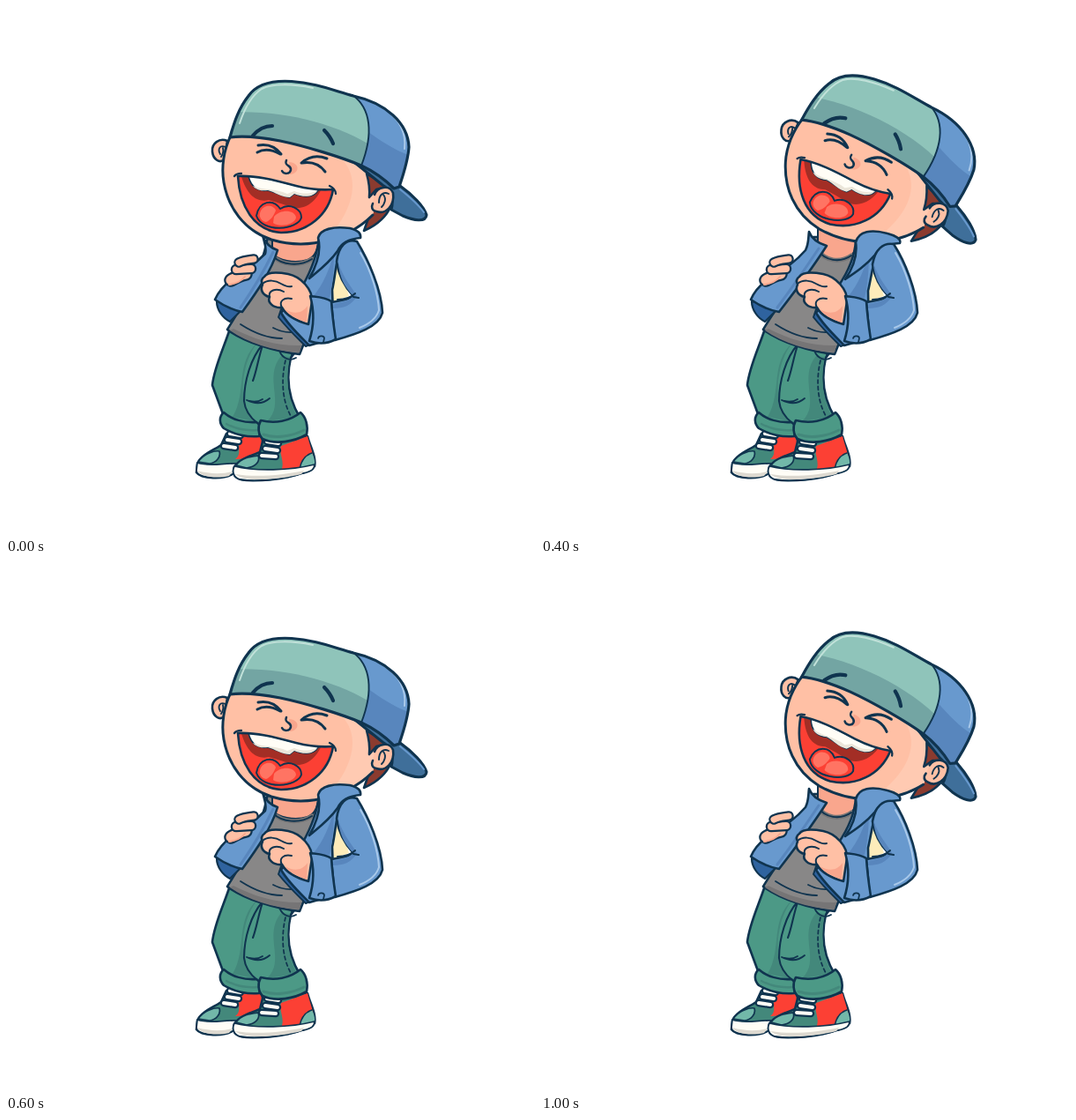
Animation, 600 px wide and 600 px high, one loop 1.2 s. Source, as an HTML page:

```html
<!DOCTYPE html>
<html lang="en">
<head>
<meta charset="utf-8">
<title>Laughing boy</title>
<style>
html, body { margin: 0; width: 100%; height: 100%; overflow: hidden; background: #fff; }
svg { display: block; width: 100vw; height: 100vh; }
path { stroke-linecap: round; stroke-linejoin: round; }
</style>
</head>
<body>
<svg id="stage" viewBox="0 0 600 600"></svg>
<script>
const C = {
  ink: '#10344f', skin: '#ffc0a5', light: '#ffcab2', blush: '#f9a68d',
  cap: '#8fc4ba', capDark: '#73a5a3', blue: '#6899ce', blueDark: '#5886bd', pale: '#a9c9ea', navy: '#3f6f9a',
  shirt: '#888787', shirtDark: '#767576', pants: '#4c9986', pantsDark: '#43887b',
  red: '#fc4034', maroon: '#a32e25', tongue: '#ff7463', white: '#fffdf6', cream: '#ebe6da',
  teal: '#72b8a9', hair: '#8b3b2f', lining: '#2f639f'
};

const shape = (d, fill, w = 2.6) =>
  `<path d="${d}" fill="${fill}" stroke="${C.ink}" stroke-width="${w}"/>`;
const area = (d, fill) => `<path d="${d}" fill="${fill}"/>`;
const line = (d, w = 2.3, color = C.ink, extra = '') =>
  `<path d="${d}" fill="none" stroke="${color}" stroke-width="${w}" ${extra}/>`;
const finger = (d, w) => line(d, w + 4.6) + line(d, w, C.skin);
const clipped = (id, d, body) =>
  `<clipPath id="${id}"><path d="${d}"/></clipPath><g clip-path="url(#${id})">${body}</g>`;

const raised = {
  name: 'raised',
  cap: 'M254 149C259 131 264 116 275 102C284 89 301 84 324 85.5C350 87 372 96 394 102C431 110 456 133 457 160C456 176 451 190 446 205L440 207C430 197 418 188 403 181C382 172 340 159 311 153C290 149 270 147 254 149Z',
  capDark: 'M250 121C309 117 374 132 420 162L450 220L240 170Z',
  capBack: 'M393 98C413 117 418 145 403 181L448 220L468 160L440 98Z',
  capBackDark: 'M411 143C427 154 441 164 462 171L447 214L402 182C409 168 412 156 411 143Z',
  seam: 'M393 101C414 116 417 145 403 181',
  shineFront: 'M265 133C271 115 278 102 290 94C302 88 324 88 348 93',
  shineBack: 'M429 116C446 128 454 144 452 162',
  brim: 'M396 178C417 183 434 198 447 204C461 214 474 227 477 237C476 246 462 243 450 238L437 231C440 222 437 208 427 203Z',
  brimShine: 'M447 208C457 216 467 224 474 234',
  face: 'M255 147C247 163 244 183 247 200C252 228 269 254 301 265C325 272 347 271 366 265C386 260 403 250 416 237L424 197L403 178L310 150Z',
  faceLight: 'M377 170C407 195 392 239 356 272L425 270L430 180Z',
  hair: 'M409 190L436 205L437 226C432 238 422 248 406 255L414 232Z',
  sideburn: 'M409 190C418 196 428 200 434 205L420 208L412 217C413 206 411 197 409 190Z',
  earFar: 'M251 153C242 149 233 156 234 165C235 174 242 179 248 174Z',
  earFarFold: 'M249 160C242 157 240 163 243 168M246 161C247 165 246 168 244 171',
  ear: 'M418 214C421 205 435 202 439 212C441 226 431 237 420 233C415 232 414 228 416 224',
  earFold: 'M423 223C423 214 428 210 434 213M428 214C432 219 429 225 426 228',
  mouth: 'M263 193C283 192 303 197 329 204C345 208 359 209 371 208C366 238 341 257 312 257C281 255 265 227 263 193Z',
  corners: 'M259 193C261 190 264 190 267 190M367 204C371 206 374 209 374 213',
  cavity: 'M266 190C273 216 285 223 298 220C309 223 317 226 329 229C342 230 354 219 359 204Z',
  teeth: 'M275 193C278 206 287 211 297 209C307 212 315 217 322 217L327 213C342 219 352 215 355 207C330 208 300 193 275 193Z',
  teethShade: 'M280 204C291 209 306 207 319 213L327 210C339 215 350 212 354 208C349 218 337 217 327 213L322 217C312 217 305 211 297 209C288 210 283 208 280 204Z',
  tongue: 'M284 238C287 221 303 218 311 230C322 223 335 230 335 240C331 254 291 258 284 238Z',
  tongueShine: 'M288 235C291 224 304 225 306 232C303 239 300 243 295 245C290 244 287 240 288 235ZM304 239C311 230 328 231 329 240C327 249 309 251 303 246Z',
  eyes: 'M286 158C297 156 306 160 312 168M285 166C294 161 302 163 311 168M335 178C344 170 354 169 364 173M336 178C348 176 356 180 362 188',
  brows: 'M280 147C286 140 294 136 302 136M361 141C365 145 369 151 371 156',
  nose: 'M318 175C315 182 324 180 323 186C322 191 315 191 313 187',
  noseShade: 'M321 177C334 178 333 190 322 191Z'
};

const bowed = {
  name: 'bowed',
  cap: 'M171 195C167 177 167 157 172 140C178 118 198 105 226 99C252 94 282 88 306 92C337 95 362 113 366 143L367 162C350 160 335 159 321 158C290 162 258 166 228 172C206 176 186 184 171 195Z',
  capDark: 'M165 170C195 143 260 130 318 130L325 200L165 200Z',
  capBack: 'M283 88C306 98 320 124 321 160L375 166L370 88Z',
  capBackDark: 'M319 130C338 134 352 132 368 126L370 166L321 160Z',
  seam: 'M283 92C306 98 320 124 321 158',
  shineFront: 'M175 152C177 130 190 115 214 107',
  shineBack: 'M350 115C357 124 361 137 361 150',
  brim: 'M322 159C350 160 378 164 398 168C410 171 418 176 417 181C413 187 395 186 372 186C364 184 350 170 322 159Z',
  brimShine: 'M378 168C392 170 405 174 413 179',
  face: 'M173 195C175 215 182 240 200 256C221 273 254 278 283 274C303 271 318 265 331 256C346 246 355 236 360 222L366 190L330 162L240 168Z',
  faceLight: 'M325 162C352 180 343 232 312 268L370 260L366 160Z',
  hair: 'M356 165L372 186C375 206 367 226 353 240L360 195Z',
  sideburn: 'M331 163C338 171 342 178 344 188L350 178L358 184L362 166Z',
  earFar: 'M178 203C168 199 160 207 161 215C163 223 171 228 181 223Z',
  earFarFold: 'M176 209C170 207 167 212 171 217M173 210C175 214 174 217 172 220',
  ear: 'M355 178C356 167 369 163 375 172C380 184 373 195 363 195C357 195 354 190 357 185',
  earFold: 'M363 187C362 177 366 174 372 175M367 177C371 183 369 188 367 191',
  mouth: 'M204 227C230 226 274 214 312 199C317 226 303 255 272 264C243 268 213 253 204 227Z',
  corners: 'M200 230C201 226 204 224 208 223M308 198C311 199 314 202 315 206',
  cavity: 'M207 224C218 241 231 244 241 239C256 237 266 231 277 233C290 229 297 217 299 203Z',
  teeth: 'M216 226C223 234 233 233 243 231C253 230 261 226 268 227L273 221C285 224 295 214 297 205C270 217 240 225 216 226Z',
  teethShade: 'M219 228C236 231 255 223 268 224L272 217C284 220 293 213 296 207C294 217 284 223 273 221L268 227C260 226 252 230 243 231C233 233 224 233 219 228Z',
  tongue: 'M243 248C245 235 261 231 268 240C274 229 293 232 295 243C297 256 270 267 250 260C244 257 242 252 243 248Z',
  tongueShine: 'M247 248C249 238 261 237 265 244C262 251 258 255 254 256C249 256 246 252 247 248ZM264 248C271 235 289 236 290 244C288 255 268 259 263 254Z',
  eyes: 'M205 182C214 178 222 180 228 187M208 191C212 186 220 184 228 187M269 178C275 171 282 168 288 167M270 178C278 177 284 177 290 179',
  brows: 'M202 173C203 167 206 162 210 160M265 143C272 145 280 150 285 156',
  nose: 'M238 184C236 191 245 190 244 196C243 201 238 201 236 198',
  noseShade: 'M241 187C253 185 255 199 244 201Z'
};

function head(h) {
  const id = part => h.name + part;
  return shape(h.earFar, C.skin) + line(h.earFarFold, 1.9) +
    shape(h.hair, C.hair) + area(h.face, C.skin) +
    clipped(id('Face'), h.face, area(h.faceLight, C.light) + area(h.noseShade, C.blush)) +
    line(h.face.split('L')[0], 3) +
    shape(h.sideburn, C.hair) +
    area(h.mouth, C.red) +
    clipped(id('Mouth'), h.mouth,
      area(h.cavity, C.maroon) + shape(h.tongue, C.red, 2) + area(h.tongueShine, C.tongue) +
      shape(h.teeth, C.white, 1.5) + area(h.teethShade, C.cream)) +
    line(h.mouth, 2.6) + line(h.corners) +
    shape(h.brim, C.navy, 3) + line(h.brimShine, 2, C.blue) +
    area(h.cap, C.cap) +
    clipped(id('Cap'), h.cap,
      area(h.capDark, C.capDark) + area(h.capBack, C.blue) + area(h.capBackDark, C.blueDark) +
      line(h.shineFront, 2, '#c2e2da') + line(h.shineBack, 2, C.pale)) +
    line(h.seam, 1.9) + line(h.cap, 3.2) +
    line(h.eyes, 3) + line(h.brows, 4.2) + line(h.nose, 2.5) +
    shape(h.ear, C.skin) + line(h.earFold, 1.9);
}

function legs() {
  const laces = ['M254 485L266 487', 'M251 492L264 494', 'M247 499L260 501',
    'M296 494L309 496', 'M294 502L308 504', 'M290 510L306 511']
    .map(d => line(d, 8.4) + line(d, 4, C.white)).join('');
  const shoes =
    shape('M217 519C221 509 235 504 244 498L250 485L289 487C293 497 290 508 281 513L264 518L258 530C247 538 221 536 216 529Z', C.pantsDark) +
    area('M267 489L288 488C293 499 289 508 281 513L260 514C269 507 260 500 267 489Z', C.red) +
    shape('M218 517C225 507 237 504 242 505C244 512 238 518 231 519Z', C.teal, 1.7) +
    shape('M217 518C231 523 247 518 262 519C259 526 262 531 251 533C236 537 216 534 216 527Z', C.white, 1.8) +
    area('M217 527C231 531 246 531 257 528L253 533C240 536 222 535 217 527Z', '#ddd9d0') +
    shape('M259 523C264 514 278 510 288 506L292 490L342 488C345 500 352 511 350 522C338 532 308 539 273 538C259 537 256 531 259 523Z', C.pantsDark) +
    area('M312 499L342 488C345 500 350 510 348 518C337 526 323 526 312 527C317 517 309 508 312 499Z', C.red) +
    area('M333 525C335 514 341 509 347 507C350 513 351 518 349 523Z', C.teal) +
    line('M333 525C335 514 341 509 347 507', 1.5) +
    shape('M261 521C267 512 278 511 286 510C289 518 281 523 273 524Z', C.teal, 1.7) +
    shape('M259 522C283 528 322 527 350 520C350 525 347 528 337 530C315 537 283 540 266 537C258 535 256 528 259 522Z', C.white, 1.8) +
    area('M260 531C284 535 315 532 338 527L335 531C311 537 271 541 260 531Z', '#ddd9d0');
  const trousers =
    shape('M254 366C247 388 236 410 234 430L248 468L286 476L334 468C321 447 317 424 323 399L330 390Z', C.pants) +
    area('M286 381C271 399 266 427 270 452L282 471L257 466C274 438 259 405 286 381Z', C.pantsDark) +
    area('M312 397L322 398C317 422 319 446 330 466L296 471C318 451 291 422 312 397Z', C.pantsDark) +
    line('M286 381C291 385 295 381 297 378M291 384C278 399 270 425 270 448C271 457 276 466 285 473M291 385C286 400 284 415 280 425', 2.1) +
    line('M273 447C283 452 292 451 299 445M276 448C284 450 288 448 291 446', 1.9) +
    line('M309 387C311 398 320 404 329 399M325 392L323 400', 1.8) +
    line('M317 402C312 423 313 447 323 465', 1.7, C.ink, 'stroke-dasharray="4 3.4"') +
    shape('M247 461C241 466 242 474 247 479C259 486 274 489 287 488C291 481 289 475 284 472C270 473 256 469 247 461Z', C.pants) +
    line('M250 474C261 480 274 482 285 481', 2.5, C.pantsDark) +
    shape('M289 470C285 477 286 486 291 491C306 498 327 494 341 486C343 476 340 466 334 461C322 471 305 474 289 470Z', C.pants) +
    line('M292 486C306 491 324 488 338 481', 3, C.pantsDark);
  return shoes + laces + trousers;
}

function fist(dx) {
  return `<g transform="translate(${dx})">` +
    shape('M293 307C297 301 309 302 320 304C335 307 348 322 347 335L343 361C329 357 318 351 313 342C303 343 296 336 299 330C291 328 288 322 291 316C289 312 290 309 293 307Z', C.skin) +
    area('M342 340L341 359C330 355 321 351 316 344C326 349 335 350 342 340Z', C.blush) +
    line('M291 315C297 310 306 311 312 315C317 318 320 319 324 318M299 330C297 323 306 319 315 324M313 342C309 335 315 330 324 332', 2) + '</g>';
}

function knuckles(dx, dy) {
  return `<g transform="translate(${dx} ${dy})">` +
    finger('M255 311C260 308 265 305 272 304', 11) +
    finger('M261 299L278 298', 8) + finger('M264 291C270 288 274 288 281 287', 7) +
    line('M253 316C261 315 267 312 271 307', 2, C.blush) + '</g>';
}

function back(p) {
  return area(p.gap, '#fdecba') +
    shape(p.shirt, C.shirt) +
    area('M258 366C283 379 309 386 335 385L333 393C302 391 274 382 254 368Z', C.shirtDark) +
    line('M266 361C283 372 298 377 313 377M303 365C312 370 323 371 331 369', 1.8) +
    shape(p.neck, C.blush, 2) +
    line(p.neckline, 5, C.shirtDark) + line(p.neckline, 1.8) +
    shape(p.lining, C.lining, 2.2) +
    shape(p.left, C.blue) +
    line(p.leftFold, 3, C.blueDark) +
    knuckles(...p.grip);
}

function front(p) {
  return shape('M312 344L309 353C321 368 333 379 340 386L349 382L343 350Z', C.lining, 2) +
    shape(p.panel, C.blue) +
    area(p.panelShade, C.blueDark) +
    shape(p.collar, C.blue) +
    fist(p.fist) +
    shape(p.sleeve, C.blue) +
    area(p.sleeveShade, C.blueDark) +
    line(p.shine, 2, C.pale) +
    line(p.crease, 2) +
    shape(p.cuff, C.blue) +
    line('M354 377C355 373 361 374 361 377L360 381', 1.7);
}

const upright = {
  head: raised, move: '', fist: 0, grip: [0, 0],
  gap: 'M371 296L378 292L389 329L368 336Z',
  shirt: 'M297 262L352 262L355 340L333 395C304 392 270 381 251 367C266 342 286 315 297 262Z',
  neck: 'M302 250L355 250C356 277 350 285 342 288C326 293 309 288 302 281Z',
  neckline: 'M303 284C313 294 333 296 347 287',
  lining: 'M239 335C239 345 246 354 254 358L270 342Z',
  left: 'M291 260C294 269 299 274 308 277C301 301 284 325 268 347C257 345 247 340 237 333C241 323 248 316 257 309C270 301 283 292 294 281C296 274 293 268 291 260Z',
  leftFold: 'M303 279C294 298 280 322 266 342',
  panel: 'M355 263L387 264C374 276 375 300 370 322L372 377L344 385C333 374 320 362 312 348L336 318C345 302 353 284 355 263Z',
  panelShade: 'M372 280C372 301 370 319 367 331L348 330C360 316 367 298 372 280Z',
  collar: 'M354 263C357 252 373 250 390 252C398 254 403 258 402 263C390 264 380 269 376 278C367 291 355 300 344 309C353 293 358 278 354 263Z',
  sleeve: 'M375 290C377 273 386 263 398 267C411 288 426 322 427 348C423 364 398 372 373 379L369 336C379 334 387 334 394 329C383 317 377 305 375 290Z',
  sleeveShade: 'M377 292C384 311 393 320 398 329C392 340 382 343 371 343L372 338C380 336 388 335 394 329C383 318 378 306 377 292Z',
  shine: 'M402 280C414 300 422 326 423 345C420 355 411 361 401 365',
  crease: 'M376 333C384 333 391 331 396 326M394 330L400 331',
  cuff: 'M345 329C353 330 362 330 369 335C370 351 372 365 374 378C365 383 355 384 344 380C349 364 350 346 345 329Z'
};

const forward = {
  head: bowed, move: '', fist: -4, grip: [-4, 3],
  gap: 'M358 272L384 317L356 324Z',
  shirt: 'M284 264L333 264L349 335L333 395C304 392 269 381 248 366C261 342 282 315 284 264Z',
  neck: 'M290 255L332 245C334 274 329 284 322 287C309 291 296 287 290 281Z',
  neckline: 'M288 287C299 298 319 299 330 286',
  lining: 'M237 332C237 343 243 353 252 358L268 343Z',
  left: 'M268 275C275 279 280 279 286 277C288 302 280 325 267 347C256 345 246 340 236 332C240 322 247 315 256 309C265 303 275 297 279 289C278 283 274 279 268 275Z',
  leftFold: 'M282 281C283 302 275 323 264 341',
  panel: 'M323 249L352 245C362 265 360 300 358 322L372 376L344 385C333 374 318 362 309 347L331 316C334 292 332 270 323 249Z',
  panelShade: 'M347 266C359 281 359 304 357 324L343 322C352 306 351 284 347 266Z',
  collar: 'M322 249C331 240 345 235 357 233C362 236 362 241 355 244C346 248 345 258 347 267C346 281 338 298 330 308C334 286 331 264 322 249Z',
  sleeve: 'M346 268C343 253 347 241 359 244C383 259 407 287 419 323C417 344 397 362 374 373L367 321C374 321 379 319 384 316C366 304 357 287 346 268Z',
  sleeveShade: 'M348 268C361 287 376 303 388 315C383 326 376 329 369 329L369 322L384 316C367 306 356 286 348 268Z',
  shine: 'M370 258C389 272 406 296 415 322C411 337 401 348 391 355',
  crease: 'M368 322C376 321 381 319 386 313M384 317L380 322',
  cuff: 'M342 322C351 325 360 324 367 321C368 340 370 355 375 370C366 377 357 380 346 380C348 360 347 341 342 322Z'
};

const leaning = {
  ...upright,
  move: 'translate(376.8 187.4) rotate(13) translate(-346.2 -187.5)',
  shirt: 'M309 262L354 262L355 340L333 395C304 392 271 381 252 367C266 342 293 313 309 262Z',
  neck: 'M314 250L360 250C359 276 355 283 347 286C333 291 319 285 314 276Z',
  neckline: 'M314 277C322 289 339 292 352 283',
  left: 'M304 256C307 264 314 269 324 272C308 297 287 325 270 347C258 345 248 340 238 333C242 323 249 316 258 309C273 301 288 291 300 277C304 269 303 262 304 256Z',
  leftFold: 'M315 275C299 299 283 322 268 342',
  panel: 'M357 266L390 268C377 280 376 302 371 323L372 377L344 385C333 374 320 362 312 348L337 318C348 302 356 284 357 266Z',
  collar: 'M357 268C360 255 375 253 393 258C401 260 409 264 407 269C392 270 383 274 379 282C369 294 357 302 345 310C354 297 359 282 357 268Z',
  sleeve: 'M376 293C379 276 388 268 400 270C413 290 426 323 427 348C423 364 398 372 373 379L369 336C379 334 387 334 394 329C383 318 378 306 376 293Z'
};

const poses = [upright, forward, leaning];

const stage = document.getElementById('stage');
stage.innerHTML = legs() + '<g id="back"></g><g id="head"></g><g id="front"></g>';
const backNode = document.getElementById('back');
const headNode = document.getElementById('head');
const frontNode = document.getElementById('front');
let shown = null;

function show(time) {
  const pose = poses[Math.floor(time % 1200 / 200) % poses.length];
  if (pose === shown) return;
  shown = pose;
  backNode.innerHTML = back(pose);
  headNode.innerHTML = head(pose.head);
  headNode.setAttribute('transform', pose.move);
  frontNode.innerHTML = front(pose);
}

const start = performance.now();
function tick(now) {
  show(Math.max(0, now - start));
  requestAnimationFrame(tick);
}
show(0);
requestAnimationFrame(tick);
</script>
</body>
</html>
```
